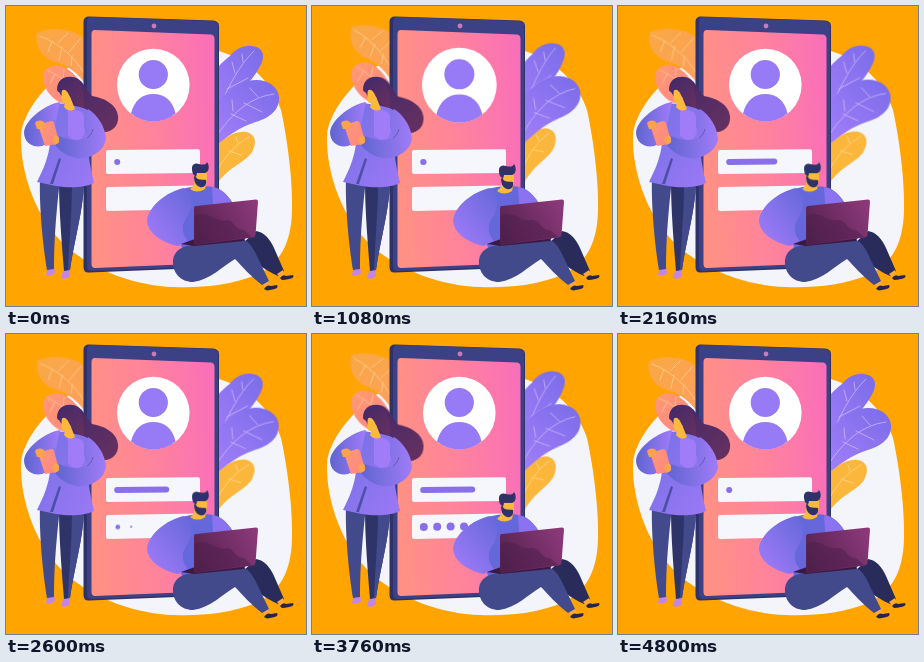
An HTML page without scripts for the animation above (4840 ms loop, 300 px wide and 300 px high).

```html
<!DOCTYPE html>
<html lang="en">
<head>
<meta charset="utf-8">
<title>Sign-in</title>
<style>
  html, body { margin: 0; width: 100%; height: 100%; overflow: hidden; background: #ffa400; }
  svg { display: block; width: 100vw; height: 100vh; }
  .vein { fill: none; stroke-width: .8; stroke-linecap: round; }
  .sway, .avatar, .name, .password, .dot { animation: 4.84s infinite linear; }

  /* Two swings per loop, each part about its own base */
  .sway { animation-name: sway; animation-timing-function: cubic-bezier(.37, 0, .63, 1); }
  .amber-left { --to: rotate(8deg); transform-origin: 80px 90px; }
  .coral-left { --to: rotate(5deg); transform-origin: 84px 98px; }
  .frond-top { --to: rotate(-4.5deg); transform-origin: 208px 105px; }
  .frond-low { --to: rotate(-5.5deg); transform-origin: 208px 140px; }
  .amber-right { --to: rotate(-8deg); transform-origin: 210px 172px; }
  .hair { --to: rotate(1.5deg); transform-origin: 64px 90px; }
  .head { --to: translate(1px, 2px); }
  @keyframes sway {
    0%, 49.59%, 99.17%, 100% { transform: none; }
    24.79%, 74.38% { transform: var(--to); }
  }

  .avatar { animation-name: pulse; transform-origin: 147.3px 79px; }
  @keyframes pulse {
    0%, 16.5%, 28%, 100% { transform: none; animation-timing-function: ease-in-out; }
    22.3% { transform: scale(1.03); animation-timing-function: ease-in-out; }
  }

  .name { stroke-dasharray: .01px 70px; animation-name: type; }
  @keyframes type {
    0%, 20.6% { stroke-dasharray: .01px 70px; animation-timing-function: cubic-bezier(.4, 0, .6, 1); }
    50.4%, 99.16% { stroke-dasharray: 49px 70px; }
    99.17%, 100% { stroke-dasharray: .01px 70px; }
  }

  .password { animation-name: show; }
  @keyframes show {
    0%, 49% { opacity: 0; }
    49.1%, 99.16% { opacity: 1; }
    99.17%, 100% { opacity: 0; }
  }
  .dot { transform-box: fill-box; transform-origin: center; animation-name: pop; animation-fill-mode: backwards; animation-delay: calc(var(--i) * .09s); }
  @keyframes pop {
    0%, 50.4% { transform: scale(0); }
    56%, 100% { transform: none; }
  }
</style>
</head>
<body>
<svg viewBox="0 0 300 300">
  <defs>
    <linearGradient id="screen" x1="0" y1=".55" x2="1" y2=".45">
      <stop offset="0" stop-color="#ff9184"/>
      <stop offset=".5" stop-color="#ff839c"/>
      <stop offset="1" stop-color="#fa70b8"/>
    </linearGradient>
    <linearGradient id="violet" x1="0" y1="0" x2="1" y2="1">
      <stop offset="0" stop-color="#7470e4"/>
      <stop offset="1" stop-color="#9c78f6"/>
    </linearGradient>
    <linearGradient id="cuff" x1="0" y1="0" x2="1" y2="0">
      <stop offset="0" stop-color="#5f64d0"/>
      <stop offset="1" stop-color="#a07cf8"/>
    </linearGradient>
    <linearGradient id="sleeve" x1="0" y1="1" x2="1" y2="0">
      <stop offset="0" stop-color="#a57cfa"/>
      <stop offset="1" stop-color="#6468da"/>
    </linearGradient>
    <linearGradient id="frond" x1="0" y1="1" x2="1" y2="0">
      <stop offset="0" stop-color="#a880fc"/>
      <stop offset="1" stop-color="#7a6ce8"/>
    </linearGradient>
    <linearGradient id="amber" x1="0" y1="0" x2="1" y2="1">
      <stop offset="0" stop-color="#f8a943"/>
      <stop offset="1" stop-color="#ff9c66"/>
    </linearGradient>
    <linearGradient id="coral" x1="0" y1="0" x2="1" y2="1">
      <stop offset="0" stop-color="#ff9a70"/>
      <stop offset="1" stop-color="#ff8488"/>
    </linearGradient>
    <linearGradient id="hair" x1="0" y1="0" x2="1" y2="1">
      <stop offset="0" stop-color="#40296a"/>
      <stop offset="1" stop-color="#68305f"/>
    </linearGradient>
    <linearGradient id="lid" x1="0" y1=".7" x2="1" y2=".3">
      <stop offset="0" stop-color="#55224f"/>
      <stop offset="1" stop-color="#8a3878"/>
    </linearGradient>
  </defs>

  <rect width="300" height="300" fill="#ffa400"/>
  <path fill="#f3f5fb" d="M15 130C16 108 38 80 62 62C110 34 190 32 228 51C252 63 268 82 275 104C282 136 287 178 286 205C285 238 274 258 250 269C226 279 196 282 168 281C130 280 86 264 60 240C31 214 14 168 15 130Z"/>

  <!-- Left leaves -->
  <g class="sway amber-left">
    <path fill="url(#amber)" d="M98 88C94 54 86 34 70 27C57 22 42 22 31 27C28 40 36 52 49 56C61 59 72 66 84 84Z"/>
    <path class="vein" stroke="#ffcf8c" d="M34 30Q66 42 86 80M46 35L42 46M56 41L53 54M66 50L65 60M52 37L62 27M63 46L74 33"/>
  </g>
  <g class="sway coral-left">
    <path fill="url(#coral)" d="M37 68C40 60 50 57 58 61C70 67 80 82 86 98L58 98C46 94 36 82 37 68Z"/>
    <path class="vein" stroke="#ffc09a" d="M41 64Q60 72 74 90M49 68L44 78M57 73L58 63"/>
  </g>

  <!-- Right leaves -->
  <g class="sway amber-right">
    <path fill="#fbb63c" d="M204 178V146C214 134 229 124 240 126C250 128 251 137 246 146C238 158 222 160 208 182Z"/>
    <path class="vein" stroke="#ffd98c" d="M243 131Q222 142 208 170M232 137L230 131M223 145L235 149"/>
  </g>
  <g class="sway frond-top">
    <path fill="url(#frond)" d="M202 122V76C210 62 216 56 224 50C229 43 238 39 246 40C256 41 259 48 256 56C252 66 244 76 234 86L206 128Z"/>
    <path class="vein" stroke="#cbb6ff" d="M248 45Q226 66 208 116M237 56L236 48M229 67L226 56M221 83L242 72"/>
  </g>
  <g class="sway frond-low">
    <path fill="url(#frond)" d="M202 142V108C214 92 228 78 242 75C258 71 272 79 273 91C274 105 262 113 247 117C234 121 222 130 204 144Z"/>
    <path class="vein" stroke="#cbb6ff" d="M268 88Q234 92 208 134M252 91L244 82M238 97L256 106M225 108L240 115M227 105L226 94"/>
  </g>

  <!-- Phone -->
  <path fill="#2e3268" d="M83 10.500L207 14.500Q213 15 213 20V256Q213 261 208 261.500L83 266.500Q77.500 267 77.500 261V16Q77.500 10.500 83 10.500Z"/>
  <path fill="#3c4084" d="M86 11L207 15Q212 15.500 212 20V255Q212 259.500 208 260L86 265Q81 265 81 260V16Q81 11 86 11Z"/>
  <path fill="url(#screen)" d="M89 24L204.500 28.500Q208.500 28.700 208.500 33V253Q208.500 257 204.500 257.300L89 262Q85.500 262 85.500 258V28Q85.500 24 89 24Z"/>
  <circle cx="148" cy="20" r="2.400" fill="#c77bb4"/>
  <g class="avatar" fill="#977af5">
    <circle cx="147.300" cy="79" r="36.300" fill="#fff"/>
    <circle cx="147.300" cy="68.500" r="14.600"/>
    <path d="M125 107.500C128 95 136 88 147.300 88S167 95 169.500 107.500C157 118 138 118 125 107.500Z"/>
  </g>
  <g fill="#f6f7fc">
    <path d="M102 144L192 143.300Q194 143.300 194 145V165Q194 167 192 167L102 168Q100 168 100 166V146Q100 144 102 144Z"/>
    <path d="M102 181L192 179.500Q194 179.500 194 181V201Q194 203 192 203L102 205Q100 205 100 203V183Q100 181 102 181Z"/>
  </g>

  <!-- Typed name, then the hidden password -->
  <path class="name" d="M111.200 156L160.200 155.500" fill="none" stroke="#8a70e8" stroke-width="6" stroke-linecap="round"/>
  <g class="password" fill="#8a70e8">
    <circle class="dot" style="--i:0" cx="111.800" cy="193" r="4"/>
    <circle class="dot" style="--i:1" cx="125.200" cy="192.800" r="4"/>
    <circle class="dot" style="--i:2" cx="138.600" cy="192.600" r="4"/>
    <circle class="dot" style="--i:3" cx="152" cy="192.400" r="4"/>
  </g>

  <!-- Woman -->
  <g>
    <path fill="#c486e6" d="M42 260H48L49 267Q45 271 40 269ZM58 262H63L64 270Q60 274 55 272Z"/>
    <path fill="#434a8c" d="M34 172C33 200 37 240 41 264L48 263C48 235 50 210 53 182L55 172Z"/>
    <path fill="#2f3468" d="M53 176C53 205 56 240 58 265L64 264C68 235 77 205 78 178Z"/>
    <path fill="#434a8c" d="M66 178C66 206 63 238 62 264L64 264C68 235 77 205 78 178Z"/>
    <path class="sway hair" fill="url(#hair)" d="M52 84C50 75 58 70 66 71C77 72 80 84 86 90C99 92 111 99 112 110C113 119 107 125 100 126C94 126 82 122 76 112L60 98Z"/>
    <path fill="url(#violet)" d="M52 97C62 99 78 100 84 106C90 112 88 128 82 142C83 156 86 168 88 177C78 182 62 182 50 180L31 176C38 162 43 150 44 136C43 122 44 104 52 97Z"/>
    <path fill="#a07cf8" d="M62 101L76 106C82 118 80 130 72 136L62 130Z"/>
    <path fill="#4c4fa6" d="M53 152L55 153L47 178L44 178Z"/>
    <path fill="url(#cuff)" d="M54 96C41 98 20 112 18 126C18 137 27 142 36 140L46 136L50 114Z"/>
    <path fill="url(#cuff)" d="M82 103C92 109 99 121 100 132C99 145 84 154 70 152C60 150 54 145 49 139L53 130C62 134 72 136 82 131C76 121 77 110 82 103Z"/>
    <path fill="none" stroke="#5b55ac" stroke-width=".8" d="M81 132C84 130 86 127 87 123"/>
    <path fill="#fdb93c" d="M56 82C61 80 65 85 65 93L69 103Q63 107 58 101L59 97C55 98 55 92 56 82Z"/>
    <path fill="url(#hair)" d="M51 84C51 73 61 69 69 72C77 76 78 88 78 102C71 99 66 95 63 89C61 84 57 82 55 86Q52 87 51 84Z"/>
    <path fill="url(#coral)" d="M32 119L45 115Q47 115 48 117L53 135Q53 137 51 138L39 140Z"/>
    <path fill="#fda34b" d="M29 117C32 113 38 114 39 118L36 123L31 123ZM47 130C51 128 54 131 53 136L49 139L46 135Z"/>
  </g>

  <!-- Man -->
  <g>
    <path fill="#292b5a" d="M236 238L250 225C258 226 264 233 268 242L278 265L272 270C259 264 249 257 243 248Z"/>
    <path fill="#fda83d" d="M271 268L277 264L279 270L275 272ZM256 276L262 273L265 280L259 281Z"/>
    <path fill="#27264a" d="M274 272Q277 268 280 270L287 269Q290 273 276 274ZM258 283Q261 278 265 280L271 279Q274 283 261 284.500Z"/>
    <path fill="#6468da" d="M174 184C186 179 202 179 211 182C220 186 226 196 231 204L218 238L176 242C172 226 168 200 174 184Z"/>
    <path fill="#8b72f0" d="M206 181C219 183 226 195 231 204L208 210Z"/>
    <path fill="#434a8c" d="M167 254C168 244 178 239 190 239L235 233C242 234 246 240 250 248L263 275L256 279C245 271 236 260 229 253C217 260 204 274 187 276C175 276 166 267 167 254Z"/>
    <path fill="url(#sleeve)" d="M178 182C160 186 143 200 141 214C141 226 154 236 172 240L182 235C176 228 174 220 182 209C187 200 187 188 178 182Z"/>
    <g class="sway head">
      <path fill="#fdb93c" d="M188 165H201V174L199 183Q191 188 184 183L188 179Z"/>
      <path fill="#2f3268" d="M187 168C184 159 188 156 193 158C197 159 200 159 201 156C204 160 203 166 199 167L191 167L190 171ZM188 170L190 171C192 175 197 173 200 174C201 179 198 182 194 181C189 179 188 175 188 170Z"/>
    </g>
    <path fill="#3a1a44" d="M175 238L189 233L240 231L238 235L188 240Z"/>
    <path fill="url(#lid)" d="M190 200L250 193.500Q252 193.500 252 195.500L249.500 229Q249 231 247 231.500L190 239Q188 239 188 237V202Q188 200 190 200Z"/>
    <path fill="#4d1f4c" opacity=".5" d="M189 210C201 203 210 217 220 214C228 213 228 224 238 224L246 231L190 238Z"/>
  </g>
</svg>
</body>
</html>
```
